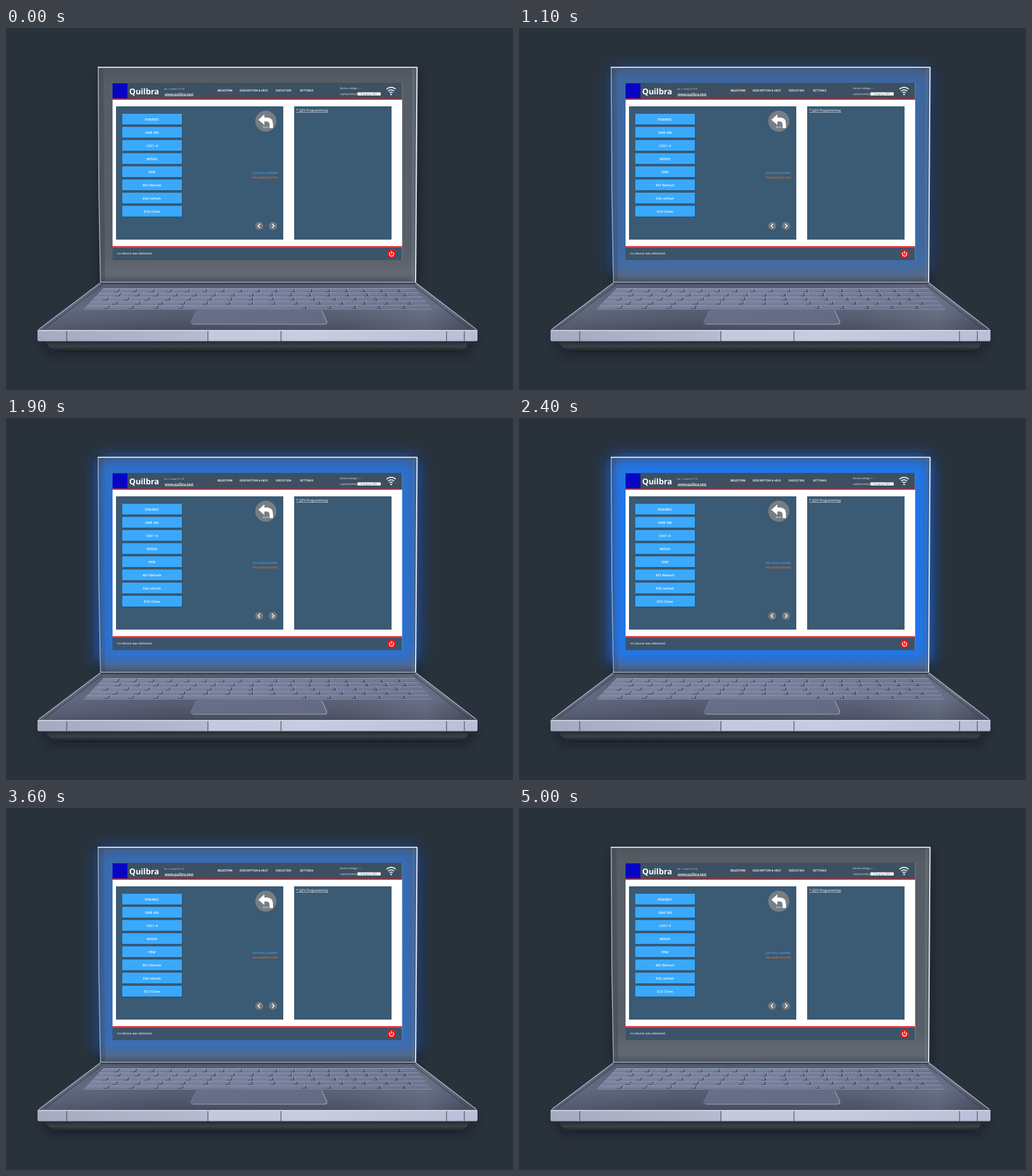
Recreate the animation shown at these times as an HTML page. Size 885 px wide and 633 px high, loop 5.1 s.

```html
<!DOCTYPE html>
<html lang="en">
<head>
<meta charset="utf-8">
<title>Laptop glow</title>
<style>
  html, body { margin: 0; width: 100%; height: 100%; overflow: hidden; background: #29323a; }
  svg { display: block; width: 885px; height: 633px; }
  text { fill: #fff; font-family: "Open Sans", sans-serif; font-size: 6px; text-rendering: geometricPrecision; }
  .mid { text-anchor: middle; }
  .nav { font-family: Roboto, sans-serif; font-size: 5px; }
  .tiny { font-family: Roboto, sans-serif; font-size: 4.6px; fill: #d9e0e6; }
</style>
</head>
<body>
<svg viewBox="0 0 885 633" xmlns="http://www.w3.org/2000/svg">
  <defs>
    <filter id="soft" filterUnits="userSpaceOnUse" x="0" y="0" width="885" height="633"><feGaussianBlur stdDeviation="12"/></filter>
    <filter id="wide" filterUnits="userSpaceOnUse" x="0" y="0" width="885" height="633"><feGaussianBlur stdDeviation="16"/></filter>
    <filter id="small" filterUnits="userSpaceOnUse" x="0" y="0" width="885" height="633"><feGaussianBlur stdDeviation="6"/></filter>
    <linearGradient id="lid" x2="0" y2="1">
      <stop offset="0" stop-color="#50575f"/><stop offset=".08" stop-color="#565d66"/>
      <stop offset=".85" stop-color="#585f69"/><stop offset=".96" stop-color="#636974"/><stop offset="1" stop-color="#4a505b"/>
    </linearGradient>
    <linearGradient id="deck" x2="0" y2="1">
      <stop offset="0" stop-color="#50586b"/><stop offset=".5" stop-color="#5c647a"/>
      <stop offset=".8" stop-color="#50566a"/><stop offset="1" stop-color="#464c5c"/>
    </linearGradient>
    <linearGradient id="sheen">
      <stop offset="0" stop-color="#8a93ab" stop-opacity=".2"/><stop offset=".3" stop-color="#8a93ab" stop-opacity="0"/>
      <stop offset=".7" stop-color="#a0a8bd" stop-opacity=".05"/><stop offset=".88" stop-color="#a0a8bd" stop-opacity=".22"/>
      <stop offset="1" stop-color="#303644" stop-opacity=".2"/>
    </linearGradient>
    <linearGradient id="keys">
      <stop offset="0" stop-color="#7d869f"/><stop offset=".5" stop-color="#7982a0"/><stop offset="1" stop-color="#6d7590"/>
    </linearGradient>
    <linearGradient id="pad" x2="1" y2="1">
      <stop offset="0" stop-color="#69718a"/><stop offset="1" stop-color="#626980"/>
    </linearGradient>
    <linearGradient id="lip">
      <stop offset="0" stop-color="#a4abc0"/><stop offset=".35" stop-color="#b3b9cf"/>
      <stop offset=".6" stop-color="#c9cde2"/><stop offset="1" stop-color="#b9bfd6"/>
    </linearGradient>
    <linearGradient id="under" x2="0" y2="1">
      <stop offset="0" stop-color="#22272d"/><stop offset=".5" stop-color="#3b4148"/><stop offset="1" stop-color="#171b20"/>
    </linearGradient>
  </defs>

  <rect width="885" height="633" fill="#29323a"/>
  <g filter="url(#small)" fill="#1c222d" opacity=".65">
    <path d="M157 72H726V450H157Z"/>
    <path d="M52 540H826L806 576H76Z"/>
  </g>

  <path d="M160 68H718.5L716 446H164Z" fill="url(#lid)"/>
  <path d="M163 71 167 443H173L170 71Z" fill="#434a54" opacity=".55"/>
  <path d="M709 71H716L714 443H708Z" fill="#7c8490" opacity=".3"/>

  <g id="glow" opacity="0">
    <rect x="148" y="60" width="582" height="372" rx="16" fill="#284da8" opacity=".35" filter="url(#wide)"/>
    <rect x="162" y="72" width="554" height="356" rx="10" fill="#1b78f2" filter="url(#soft)"/>
  </g>

  <g fill="none">
    <path d="M161 69 162 285 165 445" stroke="#a3adba" stroke-width="1.5"/>
    <path d="M163 72 166 442" stroke="#3d4550" stroke-width="1" opacity=".7"/>
    <path d="M160 68.7H718" stroke="#e0e6ed" stroke-width="2"/>
    <path d="M162 71H715" stroke="#3e4650" stroke-width="1" opacity=".7"/>
    <path d="M717.5 69 715 445" stroke="#e3e8ef" stroke-width="2"/>
    <path d="M714.5 72 713 442" stroke="#434b58" stroke-width="1" opacity=".7"/>
  </g>

  <path d="M100 546H788L808 549Q803 566 780 567H104Q76 565 69 548Z" fill="url(#under)"/>
  <path d="M164 445H716L823 529H55Z" fill="url(#deck)"/>
  <path d="M164 445H716L823 529H55Z" fill="url(#sheen)"/>
  <path d="M165 444.5H715" stroke="#a2a9b7" stroke-width="1.4"/>
  <path d="M166 446.7H714" stroke="#303744" stroke-width="2"/>
  <path d="M164 446 57 527M716 446 821 527" fill="none" stroke="#a8b0c2" stroke-width="1.5"/>
  <path d="M169 449 68 525M711 449 808 525" fill="none" stroke="#373e4b" stroke-width="1.5" opacity=".7"/>
  <path d="M170 455H714L744 492H135Z" fill="url(#keys)"/>
  <g id="board"/>
  <path d="M337 493H547Q551 493 552 496L560 513Q561 518 555 518H326Q321 518 323 514L332 496Q333 493 337 493Z" fill="url(#pad)"/>
  <path d="M551 494 560 513Q561 518 555 518H326" fill="none" stroke="#a0a8bf" stroke-width="1.2"/>
  <path d="M333 494 322 515" stroke="#7c849c"/>

  <path d="M55 528H823V545Q823 548 819 548H59Q55 548 55 545Z" fill="url(#lip)"/>
  <path d="M352 530H480V547H352Z" fill="#c4c9dd"/>
  <path d="M56 529H822" stroke="#d9deeb" stroke-width="1.3"/>
  <path d="M57 547.4H821" stroke="#858da0" stroke-width="1.2"/>
  <path d="M106 530V548M352.500 530V548M480 530V548M769 530V548M800 530V548" stroke="#474e5e" stroke-width="1.2"/>

  <rect x="186" y="96" width="505.500" height="310" fill="#fff"/>
  <rect x="186" y="96" width="505.500" height="28" fill="#3c5062"/>
  <rect x="186" y="123.500" width="505.500" height="2" fill="#e8141c"/>
  <rect x="186" y="381.500" width="505.500" height="2" fill="#e8141c"/>
  <rect x="186" y="383.500" width="505.500" height="22.500" fill="#3c5469"/>
  <rect x="192" y="137" width="292" height="233" fill="#3b5a73"/>
  <rect x="503" y="137" width="170" height="233" fill="#3b5a73"/>

  <rect x="186" y="97" width="26" height="26" fill="#0705c4"/>
  <text x="215" y="115.500" font-weight="700" style="font-size:14px">Quilbra</text>
  <text class="tiny" x="276" y="107.500" style="font-size:3.6px">Ver.: 1.0 build: 271119</text>
  <text x="277" y="117.500" font-weight="600" text-decoration="underline" style="font-size:6.1px">www.quilbra.test</text>
  <g id="tabs"/>
  <rect x="362" y="113.800" width="42" height="1.400" fill="#c51f2c"/>
  <text class="tiny" x="583" y="106.500">Device voltage --.--</text>
  <text class="tiny" x="583" y="117">Laptop battery</text>
  <rect x="613.500" y="112.500" width="40.500" height="5.500" fill="#fff"/>
  <text class="tiny mid" x="633.500" y="117" style="fill:#5a6874">Charging 100%</text>
  <g fill="none" stroke="#e6eaed" stroke-width="1.8">
    <path d="M664.200 107.200A11 11 0 0 1 680.200 107.200M667 110.300A7.200 7.200 0 0 1 677.400 110.300M669.500 113.200A3.800 3.800 0 0 1 674.900 113.200"/>
  </g>
  <circle cx="672.200" cy="116" r="1.500" fill="#e6eaed"/>

  <g id="menu"/>
  <circle cx="453.500" cy="163" r="18.500" fill="#767e84"/>
  <path d="M440.500 160.500 451 151V156.500H456Q466 157 466 168V175H460V169Q460 163.500 455 163.500H451V169.500Z" fill="#fff"/>
  <text class="tiny mid" x="453.500" y="174.800">Back</text>
  <g font-style="italic" font-weight="600">
    <text x="430" y="254.500" style="font-size:5px;fill:#47a3e6">Sub items available</text>
    <text x="430" y="263" style="font-size:5px;fill:#f26522">Executable function</text>
  </g>
  <circle cx="442" cy="346" r="7" fill="#72797f"/>
  <circle cx="466" cy="346" r="7" fill="#72797f"/>
  <path d="M443.500 342.500 440 346 443.500 349.500M464.500 342.500 468 346 464.500 349.500" fill="none" stroke="#fff" stroke-width="1.600"/>
  <text x="506.500" y="146" text-decoration="underline" style="font-size:5.9px">* QZV Programming</text>
  <text x="194" y="396.300" style="font-size:5.6px">no device was detected.</text>
  <circle cx="673" cy="395" r="7.500" fill="#ee1418"/>
  <path d="M670.500 392.200A3.800 3.800 0 1 0 675.500 392.200M673 390V395" fill="none" stroke="#fff" stroke-width="1.300"/>
</svg>
<script>
const ns = "http://www.w3.org/2000/svg";
const byId = id => document.getElementById(id);

function add(parent, tag, attrs, label) {
  const el = document.createElementNS(ns, tag);
  for (const key in attrs) el.setAttribute(key, attrs[key]);
  if (label) el.textContent = label;
  parent.appendChild(el);
}

const items = ["FEM/BDC", "DME ISN", "CAS1~4", "M35XX", "FRM", "KEY Refresh", "EGS refresh", "ECU Clone"];
items.forEach((label, i) => {
  const y = 150 + 23 * i;
  add(byId("menu"), "rect", { x: 203, y: y + 0.5, width: 104.5, height: 19.5, fill: "#2c4960" });
  add(byId("menu"), "rect", { x: 203, y, width: 104, height: 18.8, fill: "#3aa9fc" });
  add(byId("menu"), "text", { x: 254.8, y: y + 11.8, class: "mid", style: "font-size:5.7px", "font-weight": 600 }, label);
});

const tabs = [[369, "SELECTION", 700], [408, "DESCRIPTION & HELP", 500], [471, "EXECUTION", 500], [513, "SETTINGS", 500]];
tabs.forEach(([x, label, weight]) =>
  add(byId("tabs"), "text", { x, y: 111.2, class: "nav", "font-weight": weight }, label));

// Keys follow the slanted sides of the deck.
const left = y => 170 - (y - 455) * 35 / 37;
const right = y => 714 + (y - 455) * 30 / 37;
const board = byId("board");
const line = (d, stroke, width) => add(board, "path", { d, stroke, "stroke-width": width, fill: "none" });

for (let row = 0; row < 5; row++) {
  const top = 455.5 + row * 7.2, bottom = top + 6.3, count = 18 - row;
  const at = (u, y) => left(y) + (right(y) - left(y)) * u;
  line(`M${left(top)} ${top}H${right(top)}`, "#98a1b8", 1);
  line(`M${left(bottom)} ${bottom}H${right(bottom)}`, "#586077", 1);
  for (let k = 1; k < count; k++) {
    if (row === 4 && k > 4 && k < 9) continue;
    const u = (k + 0.3 * Math.sin(row * 2.4)) / count;
    const x = at(u, bottom);
    line(`M${at(u, top + 1.5)} ${top + 1.5}L${x} ${bottom}h-7`, "#3e455a", 1.6);
    line(`M${at(u, top + 1) + 2} ${top + 1}L${x + 2} ${bottom - 1}`, "#98a1b9", 1);
  }
}
line("M136 491.500H743", "#959db4", 1.2);

const loop = 5100, step = 100, peak = 2500;
const glow = byId("glow");
function draw(now) {
  const t = Math.floor((now % loop) / step) * step;
  glow.setAttribute("opacity", 1 - Math.abs(t - peak) / peak);
  requestAnimationFrame(draw);
}
draw(performance.now());
</script>
</body>
</html>
```
